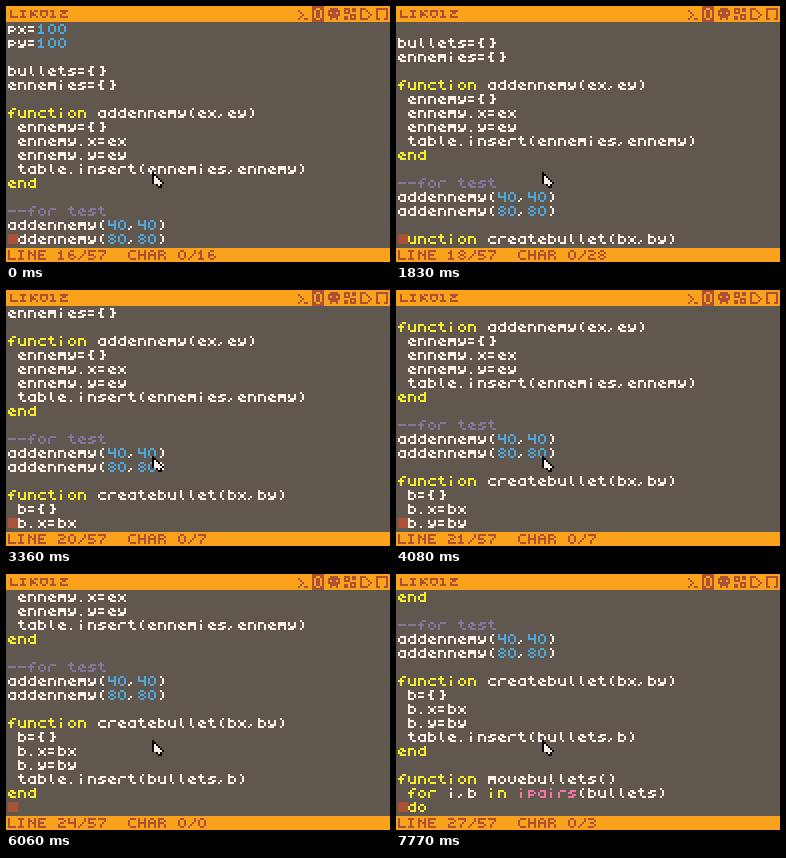
An HTML page with a canvas for the animation above (8000 ms loop, 384 by 256 pixels).

```html
<!DOCTYPE html>
<html lang="en">
<head>
<meta charset="utf-8">
<title>Code editor</title>
<style>
  html, body { margin: 0; width: 100%; height: 100%; overflow: hidden; background: #60584f; }
  canvas { position: absolute; left: 0; top: 0; }
  /* Selectable text layer; the canvas paints it in the pixel typeface. */
  .text { position: absolute; left: 2px; top: 16px; width: 382px; height: 226px; overflow: hidden;
    color: transparent; font: 16.6px/14px "DejaVu Sans Mono", monospace; }
  pre, p { position: absolute; margin: 0; font: inherit; white-space: pre; }
  .bar { top: 242px; height: 14px; }
</style>
</head>
<body>
<canvas id="stage" width="384" height="256"></canvas>
<div class="text"><pre id="code">px=100
py=100

bullets={}
ennemies={}

function addennemy(ex,ey)
 ennemy={}
 ennemy.x=ex
 ennemy.y=ey
 table.insert(ennemies,ennemy)
end

--for test
addennemy(40,40)
addennemy(80,80)

function createbullet(bx,by)
 b={}
 b.x=bx
 b.y=by
 table.insert(bullets,b)
end

function movebullets()
 for i,b in ipairs(bullets)
 do</pre></div>
<div class="text bar"><p id="status"></p></div>
<script>
const ctx = document.getElementById('stage').getContext('2d');
const code = document.getElementById('code');
const status = document.getElementById('status');
const lines = code.textContent.split('\n');

const LOOP = 8000, ROWS = 16, FIRST = 16, CELL = 2;
const grey = '#60584f', orange = '#faa21b', brown = '#ab5236', white = '#fff1e9';
const yellow = '#f7ec2f', blue = '#51a6dc', lavender = '#83769c', pink = '#f176a6';

// Caret toggles; from the fourth on, each return of the caret moves one line down.
const toggles = [210, 660, 1020, 1260, 1650, 1830, 2250, 2670, 3060, 3360, 3750, 4080,
  4500, 4770, 5160, 5430, 5820, 6060, 6450, 6600, 6960, 7140, 7530, 7770];

// Pen strokes through the points a..t of a 4 by 5 grid, read row by row.
const glyphs = {
  a: 'hfimrth', b: 'aqsplge', c: 'hfimrt', d: 'dtrmifh', e: 'trmifglkn', f: 'dcfr ik',
  i: 'b jr', l: 'bns', m: 'qeht jk', n: 'qeglt', o: 'fglpsrmif', p: 'qeglom', r: 'hfiq',
  s: 'hfijopsq', t: 'bnst eg', u: 'emrth', v: 'emrsph', x: 'et hq', y: 'einp hpsq',
  A: 'qebcht il', C: 'dbemrt', E: 'daqt ik', H: 'aq dt il', I: 'ac br qs', K: 'aq dit',
  L: 'aqt', N: 'aq dt ak', O: 'bchpsrmeb', R: 'qachki kpt',
  0: 'bchpsrmeb', 1: 'ebr qs', 2: 'achkjmqt', 3: 'achkpsq jk', 4: 'ail dt', 5: 'daikpsq',
  6: 'cbemrspki', 7: 'adhnr', 8: 'bchkpsrmjeb', 9: 'ljebchpsr',
  '=': 'eg mo', '(': 'cfns', ')': 'bgor', '{': 'cbrs i', '}': 'bcsr l',
  ',': 'nq', '.': 'r', '-': 'il', '/': 'dhnq'
};

// Toolbar strokes, as column and row pairs on an 8 by 8 grid.
const icons = [
  '224426 5666',
  '31222536 41525546',
  '2151 1262 13 3343 63 1464 2555 26 56',
  '1131331311 51616252 15162625 4464664644',
  '113164461611',
  '2616116166 56'
];

function rect(color, x, y, w, h) {
  ctx.fillStyle = color;
  ctx.fillRect(x, y, w, h);
}

function stroke(points, x, y, color) {
  points.forEach(([x1, y1], i) => {
    const [x0, y0] = points[Math.max(0, i - 1)];
    const n = Math.max(Math.abs(x1 - x0), Math.abs(y1 - y0), 1);
    for (let k = 0; k <= n; k++) {
      const cx = Math.round(x0 + (x1 - x0) * k / n);
      const cy = Math.round(y0 + (y1 - y0) * k / n);
      rect(color, x + cx * CELL, y + cy * CELL, CELL, CELL);
    }
  });
}

const gridPoint = ch => {
  const i = ch.charCodeAt(0) - 97;
  return [i % 4, i >> 2];
};
const squat = ([x, y]) => [x, Math.max(0, y - 1)];

function write(text, x, y, color, shape = p => p) {
  [...text].forEach((ch, i) => {
    if (ch === ' ') return;
    for (const run of glyphs[ch].split(' '))
      stroke([...run].map(gridPoint).map(shape), x + i * 10, y, color);
  });
}

function writeCode(line, y) {
  const token = /(--.*)|\b(function|end|for|in|do)\b|\b(ipairs)\b|\b(\d+)\b|./g;
  for (const m of line.matchAll(token)) {
    const color = m[1] ? lavender : m[2] ? yellow : m[3] ? pink : m[4] ? blue : white;
    write(m[0], 2 + m.index * 10, y, color);
  }
}

function drawToolbar() {
  rect(orange, 0, 0, 384, 16);
  write('LIKO12', 4, 4, brown, squat);
  icons.forEach((icon, i) => {
    const x = 288 + i * 16, active = i === 1;
    if (active) rect(brown, x + 2, 0, 12, 16);
    for (const run of icon.split(' '))
      stroke(run.match(/../g).map(p => [+p[0], +p[1]]), x, 0, active ? orange : brown);
  });
}

function drawPointer(x, y) {
  for (let r = 0; r < 6; r++) {
    rect('#000', x, y + r * CELL, (r + 1) * CELL, CELL);
    if (r > 0) rect(white, x + CELL, y + r * CELL, (r - 1) * CELL, CELL);
  }
  rect('#000', x + 4, y + 12, 6, 2);
  rect(white, x + 6, y + 10, 2, 4);
  rect('#000', x + 6, y + 14, 4, 2);
}

function draw(t) {
  const n = toggles.filter(at => at <= t).length;
  const current = FIRST + Math.max(0, (n >> 1) - 1);
  const top = current - ROWS;

  rect(grey, 0, 0, 384, 256);
  lines.slice(top, current).forEach((line, i) => writeCode(line, 18 + i * 14));
  if (n % 2 === 0) rect(brown, 2, 228, 10, 10);

  drawToolbar();
  rect(orange, 0, 242, 384, 14);
  const label = `LINE ${current}/57  CHAR 0/${lines[current - 1].length}`;
  write(label, 2, 244, brown);
  drawPointer(146, 166);

  code.style.top = `${-top * 14}px`;
  if (status.textContent !== label) status.textContent = label;
}

const start = performance.now();
function tick() {
  draw((performance.now() - start) % LOOP);
  requestAnimationFrame(tick);
}
tick();
</script>
</body>
</html>
```
